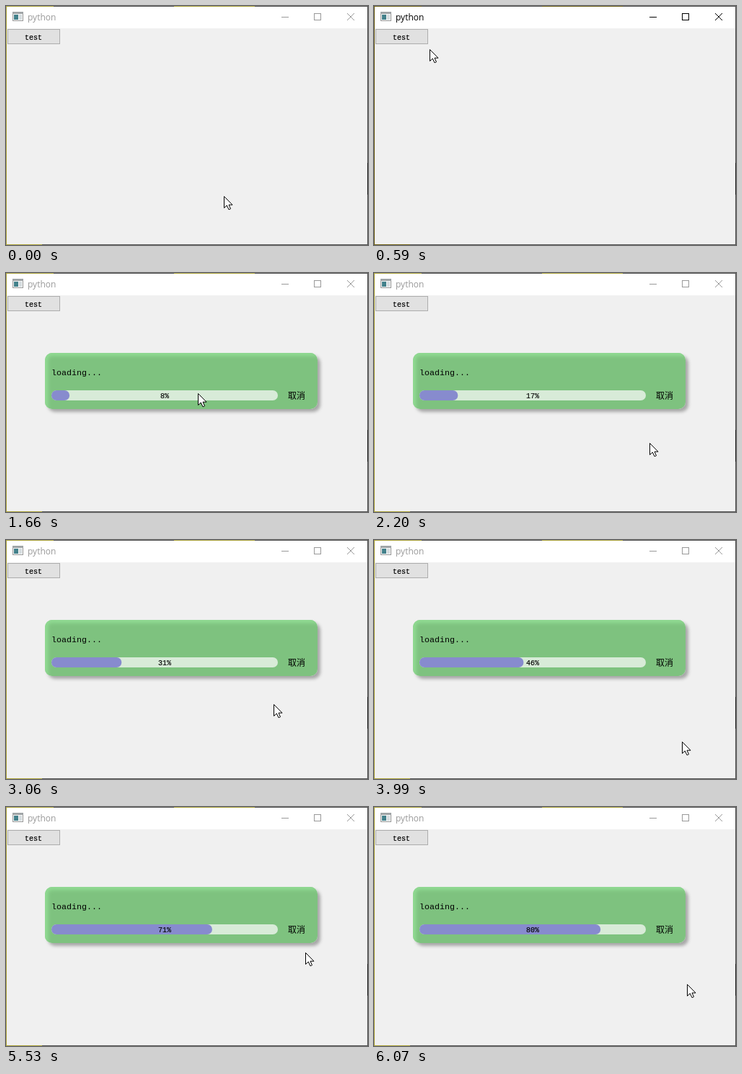
These frames come from a looping animation (502 px wide and 332 px high, 6.15 s). An HTML page:

```html
<!DOCTYPE html>
<html lang="en">
<head>
<meta charset="utf-8">
<title>Progress dialog</title>
<style>
  html, body { margin: 0; width: 100%; height: 100%; overflow: hidden; background: #f0f0f0; }
  svg { display: block; width: 502px; height: 332px; }
  .mono { font-family: "Liberation Mono", "DejaVu Sans Mono", monospace; font-size: 10px; }
  .title { font: 12px "Open Sans", "Noto Sans", sans-serif; }
  .cjk { font: 12px "Noto Sans CJK SC", "Noto Sans CJK", sans-serif; }
  .crisp { shape-rendering: crispEdges; }
</style>
</head>
<body>
<svg viewBox="0 0 502 332">
  <defs>
    <filter id="shadow" x="-10%" y="-30%" width="120%" height="160%">
      <feDropShadow dx="4" dy="4" stdDeviation="2" flood-color="#000" flood-opacity=".3"/>
    </filter>
    <filter id="soft" filterUnits="userSpaceOnUse" x="30" y="90" width="430" height="130">
      <feGaussianBlur stdDeviation="2.5"/>
    </filter>
    <clipPath id="panel"><rect x="54" y="111" width="378" height="78" rx="10"/></clipPath>
  </defs>

  <rect width="502" height="332" fill="#f0f0f0"/>
  <rect x="1" y="1" width="500" height="30" fill="#fff"/>

  <g class="crisp">
    <path d="M0 .5H502M501.5 0V332M0 331.5H502" stroke="#555" fill="none"/>
    <path id="edge" d="M.5 0V332M0 .5H66M233 .5H345M0 331.5H50" fill="none"/>
    <path d="M501.5 218V262" stroke="#222"/>
  </g>

  <g id="icon" class="crisp">
    <rect x="9.5" y="8.5" width="14" height="12" fill="#f4f6f6" stroke="#999"/>
    <rect x="9" y="8" width="15" height="3" fill="#a0a5a7"/>
    <rect x="11" y="12" width="6" height="7" fill="#43818b"/>
    <rect x="18" y="12" width="4" height="7" fill="#d5dcdf"/>
  </g>
  <text id="title" class="title" x="30" y="20">python</text>
  <g id="controls" fill="none">
    <path class="crisp" d="M382 15.5H392M427.5 10.5H436.5V19.5H427.5Z"/>
    <path d="M473 10L483 20M483 10L473 20"/>
  </g>

  <rect id="button" class="crisp" x="2.5" y="32.5" width="72" height="20"/>
  <text class="mono" x="26" y="47" stroke="#000" stroke-width=".2">test</text>

  <g id="dialog">
    <rect x="54" y="111" width="378" height="78" rx="10" fill="#7ec27f" filter="url(#shadow)"/>
    <g clip-path="url(#panel)">
      <path d="M54 195V121Q54 111 64 111H438" fill="none" stroke="#90da92" stroke-width="9" filter="url(#soft)"/>
    </g>
    <text class="mono" x="63" y="142" style="font-size:11.67px">loading...</text>
    <rect x="63" y="163" width="314" height="14" rx="7" fill="#d8ebd8"/>
    <rect id="chunk" x="63" y="163" height="14" fill="#878bce"/>
    <text id="percent" class="mono" x="220" y="174" text-anchor="middle" stroke="#000" stroke-width=".15"></text>
    <rect id="cancel" x="383" y="160" width="40" height="20" rx="10" fill="#b27c6d"/>
    <text class="cjk" x="391" y="175">取消</text>
  </g>

  <path id="cursor" d="M.5 .5V16.5L4.3 13 7 18.8 9.5 17.7 7 12.2H12Z" fill="#fff" stroke="#000" stroke-linejoin="round"/>
</svg>
<script>
const LOOP = 6150;
const ACTIVATE = 150, OPEN = 1060;
const PROGRESS_START = 1140, MS_PER_PERCENT = 61.4;

// time, x, y of the pointer tip
const route = [
  [0, 302, 264], [100, 302, 264], [590, 77, 60], [780, 55, 44], [1290, 55, 44],
  [1900, 376, 231], [2200, 382, 236], [2550, 389, 242], [2750, 391, 245],
  [3060, 371, 228], [3250, 371, 228], [3800, 421, 276], [4000, 427, 280],
  [4200, 424, 272], [4560, 402, 181], [4840, 400, 164], [5240, 402, 166],
  [5850, 430, 244], [6070, 434, 246], [LOOP, 434, 246]
];

const $ = id => document.getElementById(id);
const set = (id, attrs) => {
  for (const key in attrs) $(id).setAttribute(key, attrs[key]);
};
const show = (id, on) => set(id, { visibility: on ? "inherit" : "hidden" });

function pointerAt(t) {
  const i = Math.max(1, route.findIndex(p => p[0] > t));
  const [t0, x0, y0] = route[i - 1], [t1, x1, y1] = route[i];
  const u = (t - t0) / (t1 - t0), k = u * u * (3 - 2 * u);
  return [Math.round(x0 + (x1 - x0) * k), Math.round(y0 + (y1 - y0) * k)];
}

const inside = ([x, y], left, top, right, bottom) =>
  x >= left && x < right && y >= top && y < bottom;

function draw(t) {
  const pointer = pointerAt(t);
  const active = t >= ACTIVATE && t < OPEN;
  const ink = active ? "#000" : "#999";
  set("title", { fill: ink });
  set("controls", { stroke: ink });
  set("edge", { stroke: active ? "#6f6118" : "#aba23a" });

  const hover = inside(pointer, 2, 32, 75, 53);
  set("button", { fill: hover ? "#dfeaf4" : "#e1e1e1", stroke: hover ? "#1c7fc9" : "#adadad" });

  const percent = Math.max(0, Math.floor((t - PROGRESS_START) / MS_PER_PERCENT));
  const width = 3.14 * percent;
  show("dialog", t >= OPEN);
  set("chunk", { width, rx: width < 14 ? 0 : 7 });
  $("percent").textContent = percent + "%";
  show("cancel", t >= OPEN && inside(pointer, 383, 160, 423, 180));

  set("cursor", { transform: `translate(${pointer})` });
}

let start;
function tick(now) {
  start ??= now;
  draw((now - start) % LOOP);
  requestAnimationFrame(tick);
}
draw(0);
requestAnimationFrame(tick);
</script>
</body>
</html>
```
